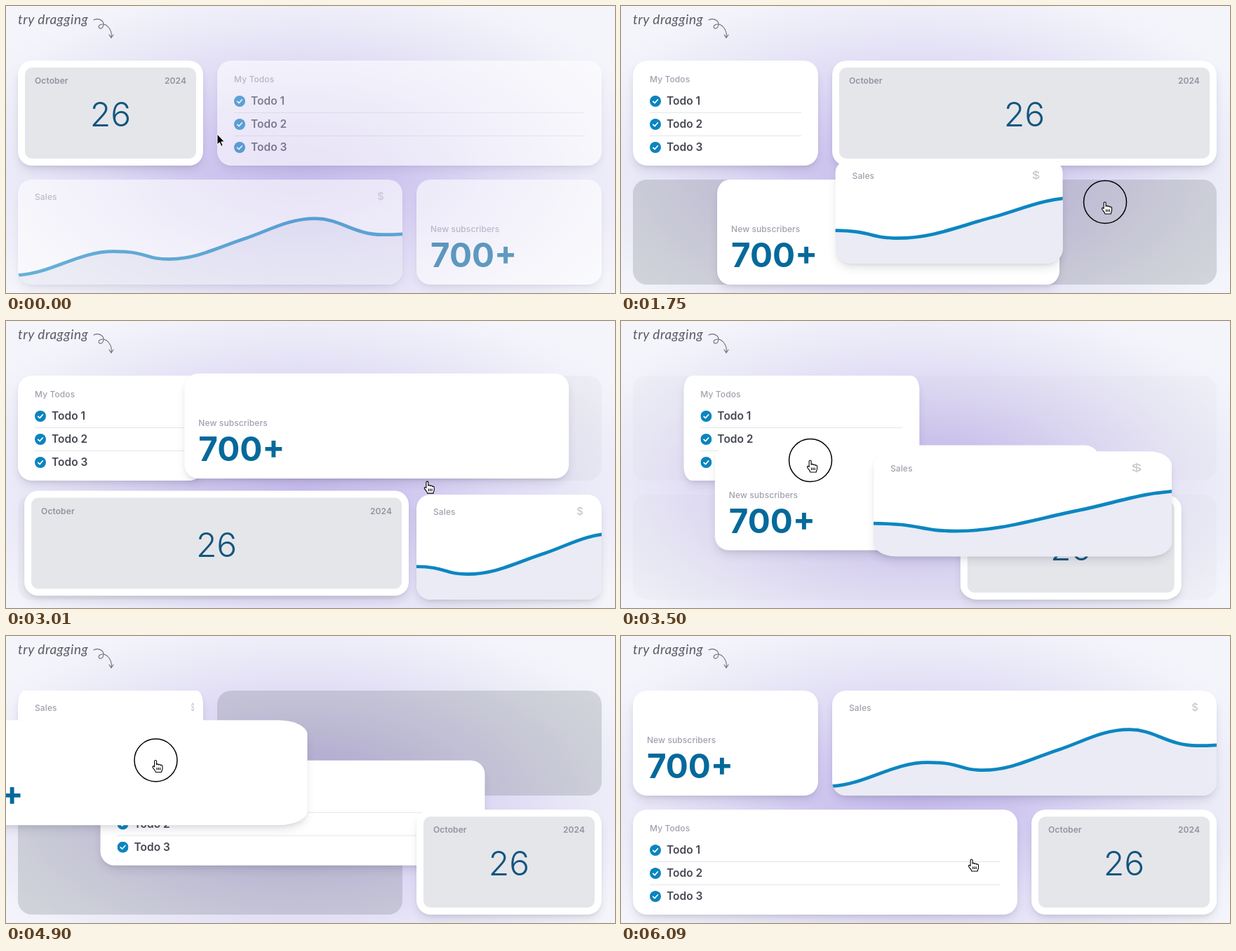
Write an HTML page that moves like this. It is 868 px wide and 410 px high and loops after 6.16 s.

```html
<!DOCTYPE html>
<html lang="en">
<head>
<meta charset="utf-8">
<title>Draggable dashboard</title>
<style>
html, body { margin: 0; width: 100%; height: 100%; overflow: hidden; }
body { font-family: Inter, "Open Sans", sans-serif; }
#stage {
  position: relative; width: 868px; height: 410px; overflow: hidden;
  background: radial-gradient(ellipse 530px 270px at 420px 235px,
    #c6bbec 0%, #cec5ef 25%, #ddd8f4 50%, #e9e8f7 75%, #f4f5fb 100%);
}
#stage * { box-sizing: border-box; }
.slot, .card, .text, .rule, .tick, .panel, #doodle, #chart, #pointer { position: absolute; }
.slot { height: 150px; border-radius: 20px; background: rgba(90, 100, 100, .22); }
.card {
  height: 150px; overflow: hidden; background: #fff;
  box-shadow: 0 8px 14px -3px rgba(40, 40, 70, .14), 0 3px 6px -3px rgba(40, 40, 70, .12);
}
.text { line-height: 20px; white-space: nowrap; }
.label { font-size: 12px; font-weight: 500; letter-spacing: .1px; color: #a0a1af; left: 24px; }
.strong { font-weight: 600; color: #9194a0; top: 19px; }
.panel { inset: 10px; border-radius: 10px; background: #e5e6ea; }
.day { left: 0; right: 0; top: 67px; text-align: center; font-size: 48px; font-weight: 300; color: #12557f; }
.todo { left: 48px; font-size: 15.5px; font-weight: 600; color: #454852; }
.tick { left: 24px; width: 16px; height: 16px; }
.rule { left: 24px; right: 24px; height: 1px; background: #e4e5ea; }
.count { left: 20px; top: 98px; font-size: 47.5px; font-weight: 700; color: #05699b; }
.dollar { top: 14px; font-size: 15px; font-weight: 500; color: #c6c8d0; }
#chart { left: 0; top: 0; width: 100%; height: 150px; }
#hint {
  left: 17px; top: 9px; font: italic 400 19px/20px Lato, "Open Sans", sans-serif;
  letter-spacing: .5px; color: #5a5b64;
}
#doodle { left: 0; top: 0; fill: none; stroke: #6c6d77; stroke-width: 1.1; stroke-linecap: round; }
#pointer { left: 0; top: 0; z-index: 20; overflow: visible; }
</style>
</head>
<body>
<div id="stage">
  <div id="hint" class="text">try dragging</div>
  <svg id="doodle" width="170" height="60">
    <path d="M125 20C133 16 142 22 138 30C135 35 129 30 134 27C142 23 152 33 150 45M147 41L150 45.5L153 41"/>
  </svg>

  <div class="card" id="cal">
    <div class="panel"></div>
    <div class="text label strong">October</div>
    <div class="text label strong" style="left:auto;right:24px">2024</div>
    <div class="text day">26</div>
  </div>

  <div class="card" id="todo">
    <div class="text label" style="top:17px">My Todos</div>
  </div>

  <div class="card" id="sales">
    <svg id="chart" preserveAspectRatio="none">
      <g transform="translate(0 .7)">
        <path id="area" fill="#eaebf4"/>
        <path id="line" fill="none" stroke="#0c86c1" stroke-width="4.7"/>
      </g>
    </svg>
    <div class="text label" style="top:15px">Sales</div>
    <div class="text dollar" id="dollar">$</div>
  </div>

  <div class="card" id="subs">
    <div class="text label" style="left:20px;top:61px">New subscribers</div>
    <div class="text count">700+</div>
  </div>

  <svg id="pointer" width="1" height="1">
    <circle id="ring" r="30.5" fill="none" stroke="#000" stroke-width="1.5"/>
    <path id="arrow" fill="#000" stroke="#fff" stroke-width="1"
      d="M0 -1V14L3.4 10.9L5.8 16.4L8.2 15.4L5.8 10H10.4Z"/>
    <g id="hand" stroke="#000" stroke-width="1.1" stroke-linejoin="round">
      <path fill="#fff" d="M-1.9 1.5C-1.9 -.5 1.1 -.5 1.1 1.5V6.3C1.5 5 3.8 5.1 4 6.7C4.6 5.6 6.7 5.8 6.9 7.4C7.6 6.5 9.5 6.9 9.5 8.6V11.8C9.5 14 8.3 14.6 8.2 17H-.2C-.5 14.6 -2.7 13 -4.1 10.7C-5.4 8.6 -3.4 7.6 -1.9 9.3Z"/>
      <path fill="none" d="M1.6 10.4V14M3.9 10.4V14M6.2 10.4V14"/>
    </g>
  </svg>
</div>

<script>
const LOOP = 6160, FRAME = 70, STEP = 5;
const EASE = 1 - Math.exp(-STEP / 119);
const SLOTS = [
  { x: 17, y: 78, w: 264 }, { x: 301, y: 78, w: 548 },
  { x: 17, y: 248, w: 548 }, { x: 585, y: 248, w: 264 }
];
const NAMES = ['cal', 'todo', 'sales', 'subs'];

// Pointer path: time, x, y
const PATH = [
  [0, 301, 184], [220, 150, 150], [300, 150, 150], [450, 200, 110], [580, 305, 140],
  [650, 413, 150], [700, 413, 150], [980, 324, 288], [1150, 340, 320], [1290, 340, 320],
  [1560, 590, 300], [1720, 690, 280], [1850, 690, 280], [2110, 473, 357], [2233, 473, 357],
  [2590, 535, 214], [2700, 575, 160], [2850, 575, 160], [3160, 625, 294], [3220, 625, 294],
  [3296, 566, 270], [3397, 398, 228], [3466, 284, 207], [3500, 270, 199], [3750, 270, 199],
  [4060, 386, 278], [4380, 482, 372], [4647, 482, 372], [4797, 380, 228], [4900, 213.5, 177.5],
  [4940, 210, 168], [5020, 230, 200], [5140, 230, 200], [5900, 500, 319], [LOOP, 500, 319]
];

// Each swap: time, slot entered
const DRAGS = [
  { name: 'cal', press: 250, drop: 700, swaps: [[580, 1]] },
  { name: 'sales', press: 1190, drop: 1850, swaps: [[1565, 3]] },
  { name: 'subs', press: 2130, drop: 2850, swaps: [[2600, 1]] },
  { name: 'sales', press: 3200, drop: 3750, swaps: [[3295, 2], [3395, 1], [3465, 0]] },
  { name: 'subs', press: 4420, drop: 5140, swaps: [[4795, 1], [4900, 0]] }
];

const $ = id => document.getElementById(id);
const clamp = v => Math.max(0, Math.min(1, v));

function pointerAt(t) {
  const i = Math.max(1, PATH.findIndex(p => p[0] >= t));
  const [t0, x0, y0] = PATH[i - 1], [t1, x1, y1] = PATH[i];
  const k = (t - t0) / (t1 - t0);
  return { x: x0 + (x1 - x0) * k, y: y0 + (y1 - y0) * k };
}

function slotShade(t) {
  return Math.max(...DRAGS.map(d =>
    Math.min(clamp((Math.min(t, d.drop) - d.press - 280) / 180), clamp(1 - (t - d.drop) / 200))));
}

// Cards ease exponentially towards their slot, or towards the pointer while held.
function simulate() {
  const cards = NAMES.map((name, slot) => ({ name, slot, ...SLOTS[slot] }));
  const frames = [];
  let grab;
  for (let t = 0; t < LOOP; t += STEP) {
    const p = pointerAt(t);
    const drag = DRAGS.find(d => t >= d.press && t < d.drop);
    const held = drag && cards.find(c => c.name === drag.name);
    if (held && t === drag.press) grab = { x: p.x - held.x, y: p.y - held.y };
    for (const c of cards) {
      const s = SLOTS[c.slot];
      const goal = c === held ? { x: p.x - grab.x, y: p.y - grab.y } : s;
      c.x += (goal.x - c.x) * EASE;
      c.y += (goal.y - c.y) * EASE;
      c.w += (s.w - c.w) * EASE;
    }
    const swap = drag && drag.swaps.find(s => s[0] === t);
    if (swap) {
      cards.find(c => c.slot === swap[1]).slot = held.slot;
      held.slot = swap[1];
    }
    if (t % FRAME === 0) {
      frames.push({ t, p, held: held && held.name, cards: cards.map(c => ({ ...c })) });
    }
  }
  return frames;
}

function build() {
  const slots = SLOTS.map(s => {
    const el = document.createElement('div');
    el.className = 'slot';
    el.style.cssText = `left:${s.x}px;top:${s.y}px;width:${s.w}px`;
    $('stage').prepend(el);
    return el;
  });
  for (let i = 0; i < 3; i++) {
    const y = 58 + 33 * i;
    $('todo').insertAdjacentHTML('beforeend',
      `<svg class="tick" style="top:${y - 8}px" viewBox="0 0 16 16"><circle cx="8" cy="8" r="8" fill="#0b84bf"/>
       <path d="M4.7 8.3L7.1 10.6L11.4 5.8" fill="none" stroke="#fff" stroke-width="1.7" stroke-linecap="round" stroke-linejoin="round"/></svg>
       <div class="text todo" style="top:${y - 10}px">Todo ${i + 1}</div>` +
      (i < 2 ? `<div class="rule" style="top:${y + 16}px"></div>` : ''));
  }
  const curve = 'M-2 136C50 133 85 102 136 102S180 113 215 113C255 113 285 96 325 83' +
    'C358 72 385 55 424 55C460 55 478 78 520 78Q535 78 550 77';
  $('line').setAttribute('d', curve);
  $('area').setAttribute('d', curve + 'V150H-2Z');
  return slots;
}

function draw({ t, p, held, cards }) {
  const shade = slotShade(t);
  slots.forEach(el => el.style.opacity = shade);
  for (const c of cards) {
    const full = SLOTS[c.slot].w, k = c.w / full;
    const style = $(c.name).style;
    style.transform = `translate(${c.x}px,${c.y}px)`;
    style.left = style.top = 0;
    style.width = c.w + 'px';
    style.borderRadius = `${20 * k}px / 20px`;
    style.zIndex = c.name === held ? 10 : c.slot + 1;
    style.opacity = c.name === 'cal' ? 1 : clamp(.6 + t / 600);
    if (c.name === 'sales') {
      $('chart').setAttribute('viewBox', `${(548 - full) / 2} 0 ${full} 150`);
      $('dollar').style.left = c.w - 31 * k + 'px';
      $('dollar').style.transform = `translateX(-50%) scaleX(${k})`;
    }
  }
  $('pointer').style.transform = `translate(${p.x}px,${p.y}px)`;
  $('ring').style.display = held ? '' : 'none';
  $('arrow').style.display = t < 140 ? '' : 'none';
  $('hand').style.display = t < 140 ? 'none' : '';
}

const slots = build();
const frames = simulate();
const start = performance.now();
function tick() {
  const t = (performance.now() - start) % LOOP;
  draw(frames[Math.floor(t / FRAME)]);
  requestAnimationFrame(tick);
}
tick();
</script>
</body>
</html>
```
